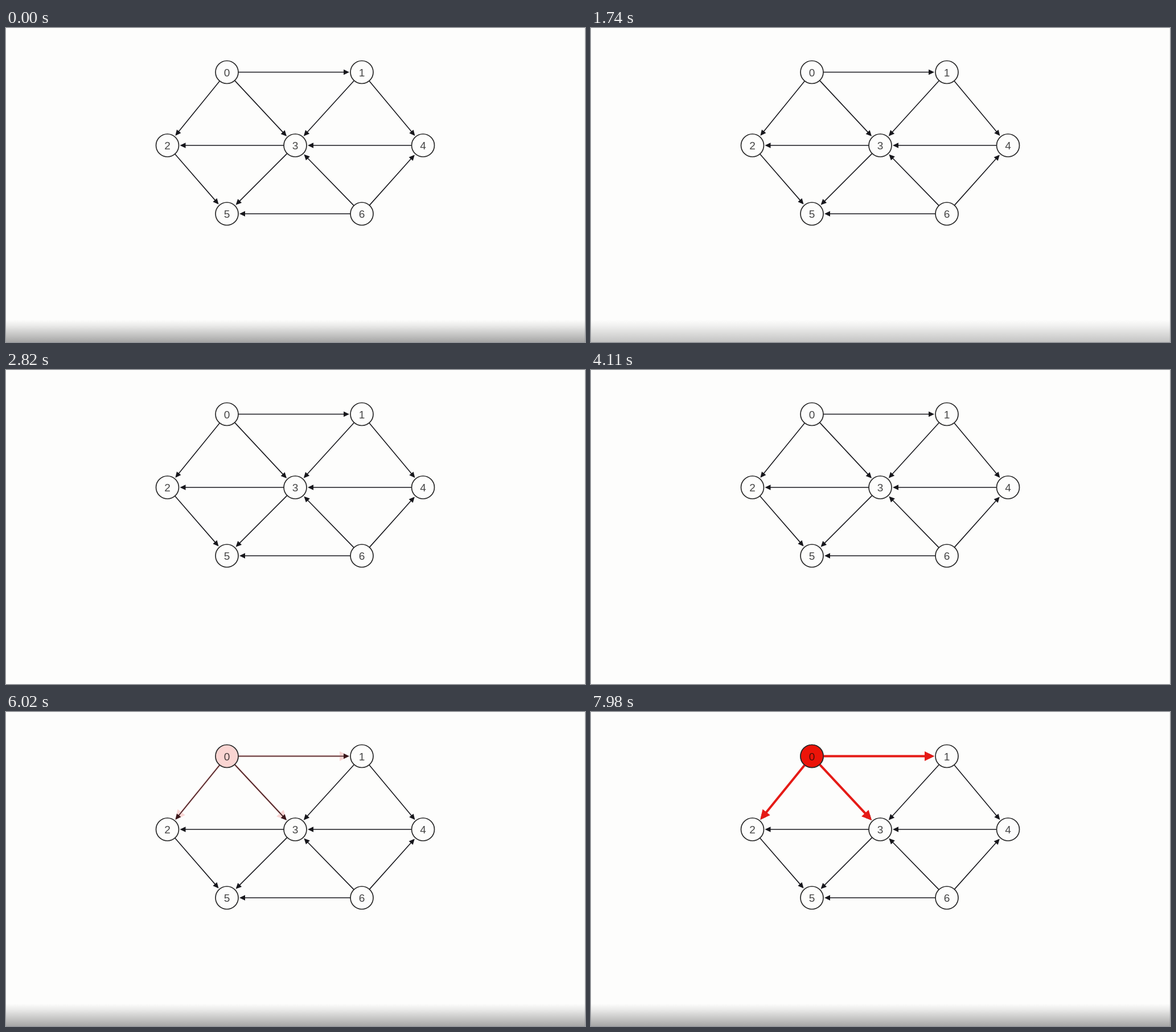
An HTML page that plays this animation: 1017x551 px, repeating every 8000 ms.

```html
<!DOCTYPE html>
<html lang="en">
<head>
<meta charset="utf-8">
<title>Directed graph</title>
<style>
  html, body { margin: 0; height: 100%; overflow: hidden; background: #fdfdfc; }
  svg { display: block; width: 1017px; height: 551px; }
  text { font: 19px "Liberation Sans", Arial, sans-serif; text-anchor: middle; }
</style>
</head>
<body>
<svg id="stage" viewBox="0 0 1017 551">
  <defs>
    <linearGradient id="shade" x1="0" y1="0" x2="0" y2="1">
      <stop offset="0" stop-opacity="0"/>
      <stop offset=".25" stop-opacity=".07"/>
      <stop offset="1" stop-opacity=".34"/>
    </linearGradient>
  </defs>
  <path d="M1016.5 0V551" stroke="#eeeeee"/>
  <g id="base"></g>
  <g id="active" opacity="0"></g>
  <rect id="bar" y="512" width="1017" height="39" fill="url(#shade)"/>
  <path id="cursor" d="M0 0V11L2.5 8.8L4 12L5.6 11.3L4.2 8.2H7Z" fill="#fff" stroke="#666" stroke-width=".9"/>
</svg>
<script>
const LOOP = 8000;
const nodes = [[388, 77.5], [625, 77.5], [283.5, 206], [508, 206], [732.5, 206], [388, 326], [625, 326]];
const edges = ['01', '02', '03', '13', '14', '32', '43', '25', '35', '63', '64', '65'];
const get = id => document.getElementById(id);

function arrow([from, to], color, width, length, half) {
  const [x1, y1] = nodes[from], [x2, y2] = nodes[to];
  const angle = Math.atan2(y2 - y1, x2 - x1) * 180 / Math.PI;
  const tip = Math.hypot(x2 - x1, y2 - y1) - 22, neck = tip - length;
  return `<g transform="translate(${x1} ${y1}) rotate(${angle})">
    <path d="M20 0H${neck + 1}" stroke="${color}" stroke-width="${width}"/>
    <path d="M${tip} 0L${neck} ${half}V${-half}Z" fill="${color}"/></g>`;
}

function node(i, fill, ink) {
  const [x, y] = nodes[i];
  return `<circle cx="${x}" cy="${y}" r="20" fill="${fill}" stroke="#292929" stroke-width="1.7"/>
    <text x="${x}" y="${y + 7}" fill="${ink}">${i}</text>`;
}

get('base').innerHTML = edges.map(e => arrow(e, '#17171c', 1.6, 10, 4.8)).join('') +
  nodes.map((_, i) => node(i, '#fdfdfc', '#444')).join('');
get('active').innerHTML = edges.slice(0, 3).map(e => arrow(e, '#e51a16', 4, 17, 8.5)).join('') +
  node(0, '#ec1409', '#4d0d09');

const ramp = (t, start, end) => Math.min(1, Math.max(0, (t - start) / (end - start)));
const smooth = u => u * u * (3 - 2 * u);

function draw(now) {
  const t = now % LOOP;
  get('bar').setAttribute('opacity', t < 4000 ? 1 - ramp(t, 1640, 1940) : ramp(t, 5330, 5500));
  get('active').setAttribute('opacity', smooth(ramp(t, 5850, 6500)));

  // The pointer rises from the bottom edge, pauses, then leaves to the left.
  const rise = smooth(ramp(t, 1160, 1390)), leave = ramp(t, 1450, 1640) ** 2;
  get('cursor').setAttribute('transform', `translate(${190 - 26 * rise - 175 * leave} ${552 - 66.5 * rise})`);
  get('cursor').setAttribute('visibility', t > 1160 && t < 1640 ? 'visible' : 'hidden');
  requestAnimationFrame(draw);
}
requestAnimationFrame(draw);
</script>
</body>
</html>
```
